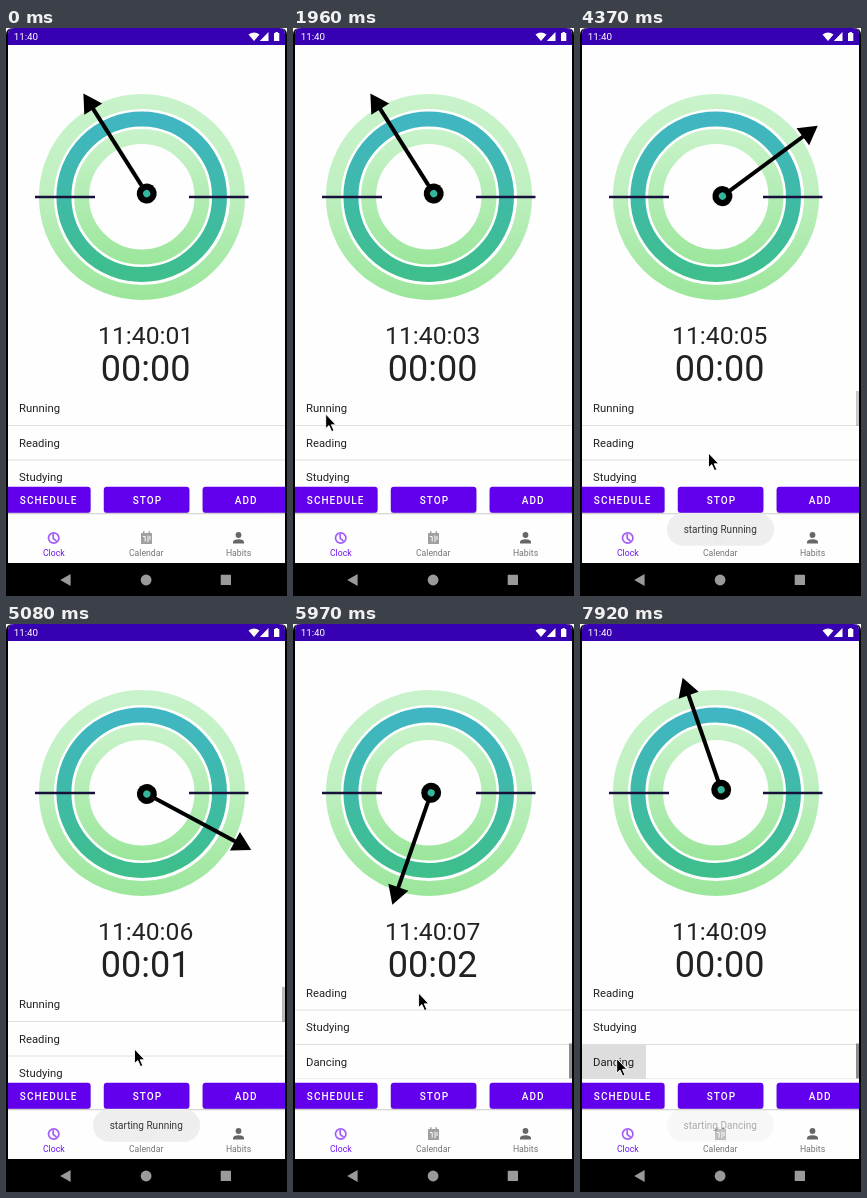
An HTML page for the animation above (8000 ms loop, 281x568 px).

```html
<!DOCTYPE html>
<html lang="en">
<head>
<meta charset="utf-8">
<title>Habit clock</title>
<style>
  html, body { margin: 0; width: 100%; height: 100%; overflow: hidden; background: #fff; }
  svg { display: block; width: 100vw; height: 100vh; font-family: Roboto, sans-serif; }
  .mid { text-anchor: middle; }
  .row { font-size: 11.3px; fill: #222; }
  .btn { font-size: 10px; font-weight: 500; letter-spacing: 1px; fill: #fff; }
  .tab { font-size: 8.7px; fill: #757575; }
</style>
</head>
<body>
<svg viewBox="0 0 281 568" xmlns="http://www.w3.org/2000/svg">
  <defs>
    <linearGradient id="green" x1="0" x2="0" y1="66" y2="272" gradientUnits="userSpaceOnUse">
      <stop offset="0" stop-color="#c9f3cb"/><stop offset=".45" stop-color="#c0f0c1"/><stop offset="1" stop-color="#9be69b"/>
    </linearGradient>
    <linearGradient id="greenIn" x1="0" x2="0" y1="101" y2="237" gradientUnits="userSpaceOnUse">
      <stop offset="0" stop-color="#c9f3cb"/><stop offset="1" stop-color="#9be69b"/>
    </linearGradient>
    <linearGradient id="teal" x1="0" x2="0" y1="83" y2="255" gradientUnits="userSpaceOnUse">
      <stop offset="0" stop-color="#40b5c5"/><stop offset="1" stop-color="#3ebf8a"/>
    </linearGradient>
    <linearGradient id="shade" x1="0" x2="0" y1="0" y2="1">
      <stop offset="0" stop-color="#000" stop-opacity=".2"/><stop offset="1" stop-color="#000" stop-opacity="0"/>
    </linearGradient>
    <clipPath id="app"><path d="M2 535V6Q2 0 8 0H273Q279 0 279 6V535Z"/></clipPath>
    <clipPath id="listBox"><rect x="2" y="363" width="277" height="92"/></clipPath>
  </defs>

  <path d="M0 568V7Q0 0 7 0H274Q281 0 281 7V568Z"/>
  <g clip-path="url(#app)">
    <rect width="281" height="535" fill="#fefefe"/>
    <rect width="281" height="17" fill="#3700b3"/>
    <text x="7.7" y="12.3" font-size="9.8" fill="#fff">11:40</text>
    <g fill="#fff">
      <path d="M242.5 6.5Q248 2.5 253.5 6.5L248 13Z"/>
      <path d="M262.5 4V13H253.8Z"/>
      <path d="M268 5H269.5V4H271.8V5H273.3V13H268Z"/>
    </g>

    <g fill="none" stroke-width="15">
      <circle cx="136" cy="169" r="95.6" stroke="url(#green)"/>
      <circle cx="135.7" cy="168.7" r="77.8" stroke="url(#teal)"/>
      <circle cx="135.8" cy="168.8" r="60.2" stroke="url(#greenIn)"/>
    </g>
    <path d="M29 169H89M183 169H242.5" stroke="#17103a" stroke-width="2.6"/>
    <g id="hand">
      <path d="M0 0V-102" stroke="#000" stroke-width="4"/>
      <path d="M0 -118.5L10.6 -100H-10.6Z"/>
      <circle r="10"/>
      <circle r="3.6" fill="#35b59c"/>
    </g>

    <g fill="#222" class="mid">
      <text id="clock" x="139.7" y="316" font-size="24.7"></text>
      <text id="timer" x="139.6" y="352.7" font-size="36"></text>
    </g>

    <g clip-path="url(#listBox)">
      <g id="list"></g>
      <rect id="bar" x="276" width="3" height="35" fill="#8c8c8c"/>
    </g>

    <g id="buttons"></g>

    <rect x="2" y="485.2" width="277" height="50" fill="#fefefe"/>
    <rect x="2" y="485" width="277" height="2" fill="url(#shade)"/>
    <g fill="none" stroke="#a35df6" stroke-width="1.7">
      <circle cx="47.7" cy="510" r="5.2"/>
      <path d="M47.2 506V510.3L50.5 513.2"/>
    </g>
    <path d="M135 505H137V503.3H138.5V505H142.5V503.3H144V505H146V516H135Z" fill="#a0a0a0"/>
    <path d="M137 508.5H139.2V513.5M142 507.5V514M144 508V512" fill="none" stroke="#fefefe"/>
    <g fill="#666">
      <circle cx="232.5" cy="507" r="2.9"/>
      <path d="M227 515.6V514Q227.5 511.3 232.5 511.2Q237.6 511.3 238 514V515.6Z"/>
    </g>
    <g class="mid">
      <text class="tab" x="47.8" y="528" style="fill:#6a14ee">Clock</text>
      <text class="tab" x="140.2" y="528">Calendar</text>
      <text class="tab" x="232.5" y="528">Habits</text>
    </g>

    <g id="toast">
      <rect x="87" y="486" width="107" height="32" rx="16" opacity=".05"/>
      <rect x="87" y="485" width="107" height="32" rx="16" fill="#eee"/>
      <text id="note" class="mid" x="140.2" y="505" font-size="10" fill="#333"></text>
    </g>
  </g>

  <g fill="#9a9a9a">
    <path d="M54.2 552L64.6 546V558Z"/>
    <circle cx="140.1" cy="552" r="5.4"/>
    <rect x="214.7" y="546.8" width="10.3" height="10.3" rx=".6"/>
  </g>
  <path id="cursor" d="M0 0V14.6L3.3 11.6L6 17.6L8.3 16.6L5.7 10.8H10.2Z" stroke="#fff" stroke-width=".9" stroke-linejoin="round"/>
</svg>
<script>
const LOOP = 8000, TICK = 88.9;
const ROW = 34.5, TOP = 363, MAX_SCROLL = 46;
const REST = -32.3, SPEED = 0.091; // degrees, degrees per ms
const HABITS = ["Running", "Reading", "Studying", "Dancing"];
const FIRST = { at: 3413, row: 0 }, SECOND = { at: 7766, row: 3 };

// Pointer moves: start, duration, end x, end y
const ENTER = [127, 560];
const MOVES = [
  [500, 400, 180, 466], [1070, 880, 32.7, 386], [2400, 170, 22.6, 379], [3640, 550, 128.5, 425],
  [5060, 620, 125.6, 369], [5950, 890, 61.3, 424.5], [6840, 700, 36.7, 434.5]
];

const $ = id => document.getElementById(id);
const set = (id, attrs) => Object.entries(attrs).forEach(([k, v]) => $(id).setAttribute(k, v));
const clamp = (v, lo = 0, hi = 1) => Math.min(hi, Math.max(lo, v));
const ease = u => u * u * (3 - 2 * u);
const pulse = (t, a, b, fade) => Math.min(clamp((t - a) / fade), clamp((b - t) / fade));
const pad = n => String(n).padStart(2, "0");

$("list").innerHTML =
  `<rect id="press" x="2" width="64" height="${ROW}"/>` +
  HABITS.map((name, i) => {
    const y = TOP + i * ROW;
    return `<text class="row" x="13" y="${y + 21.3}">${name}</text>
      <path d="M2 ${y + ROW}H279" stroke="#dfdfdf"/>`;
  }).join("");

$("buttons").innerHTML = ["SCHEDULE", "STOP", "ADD"].map((label, i) => {
  const x = -1 + i * 98.8;
  return `<rect x="${x}" y="460" width="85.6" height="26" rx="3" opacity=".2"/>
    <rect x="${x}" y="458.7" width="85.6" height="26" rx="3" fill="#6200ee"/>
    <text class="btn mid" x="${x + 43.6}" y="475.5">${label}</text>`;
}).join("");

function pointer(t) {
  let [x, y] = ENTER;
  for (const [start, time, endX, endY] of MOVES) {
    const u = ease(clamp((t - start) / time));
    x += (endX - x) * u;
    y += (endY - y) * u;
  }
  return [x, y];
}

function draw(time) {
  const t = Math.floor(time / TICK) * TICK;
  const tap = t >= SECOND.at - 40 ? SECOND : FIRST;
  const run = t >= SECOND.at ? SECOND : FIRST;
  const since = t - tap.at;

  const turn = REST + Math.max(0, t - run.at) * SPEED;
  set("hand", { transform: `translate(140.2 167.8) rotate(${turn}) translate(1.6 -1.6)` });

  const sec = Math.floor((t + 467) / 1000) + 1;
  $("clock").textContent = "11:40:" + pad(sec);
  $("timer").textContent = "00:" + pad(run === SECOND ? 0 : Math.max(0, sec - 5));

  const [x, y] = pointer(t);
  set("cursor", { transform: `translate(${x} ${y})`, opacity: t < 500 ? 0 : 1 });

  // The list follows the drag after a short touch slop, then stays
  const scroll = t < 5060 ? 0 : t > 5680 ? MAX_SCROLL : clamp(416 - y, 0, MAX_SCROLL);
  set("list", { transform: `translate(0 ${-scroll})` });
  set("bar", {
    y: TOP + scroll * 56.5 / MAX_SCROLL,
    opacity: Math.max(pulse(since, -10, 1000, 120), pulse(t, 4950, 6350, 200))
  });

  set("press", {
    y: TOP + tap.row * ROW,
    opacity: since < -40 ? 0 : 0.13 * clamp((387 - since) / 239)
  });

  $("note").textContent = "starting " + HABITS[tap.row];
  set("toast", { opacity: 0.98 * pulse(since, 0, 2390, 350) });
}

function frame() {
  draw(performance.now() % LOOP);
  requestAnimationFrame(frame);
}
frame();
</script>
</body>
</html>
```
